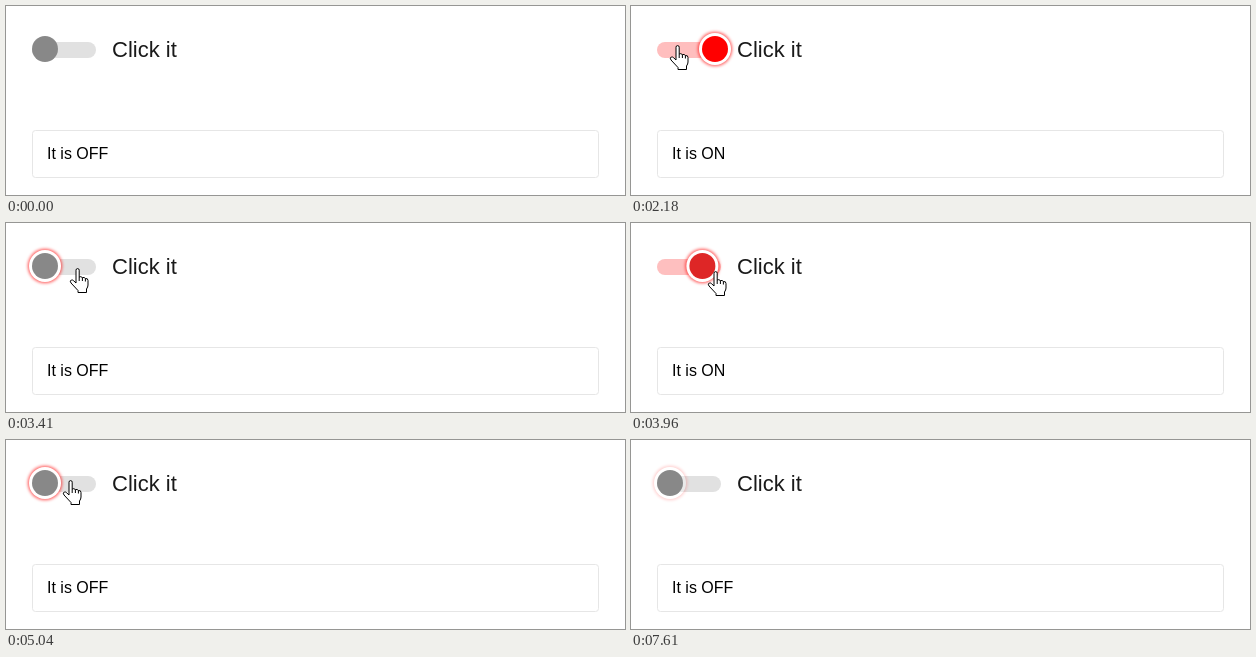
An HTML page that plays this animation: 619 px wide and 189 px high, repeating every 7690 ms.

```html
<!DOCTYPE html>
<html lang="en">
<head>
<meta charset="utf-8">
<title>Toggle switch</title>
<style>
  html, body { margin: 0; width: 100%; height: 100%; overflow: hidden; background: #fff; }
  svg { display: block; font-family: Arial, "Liberation Sans", sans-serif; }
  #cursor path { fill: #fff; stroke: #000; stroke-linejoin: round; }
</style>
</head>
<body>
<svg width="619" height="189" viewBox="0 0 619 189">
  <filter id="soft" x="-30%" y="-30%" width="160%" height="160%"><feGaussianBlur stdDeviation="1.4"/></filter>
  <rect id="track" x="26" y="36" width="64" height="16" rx="8"/>
  <g id="knob">
    <g id="ring">
      <circle r="17.3" fill="#f00" fill-opacity=".6" filter="url(#soft)"/>
      <circle r="16" fill="#fff"/>
    </g>
    <circle id="dot" r="13"/>
  </g>
  <text x="106" y="51" font-size="22" fill="#1a1a1a">Click it</text>
  <rect x="26.5" y="124.5" width="566" height="47" rx="3" fill="#fff" stroke="#e6e6e6"/>
  <text id="state" x="41" y="153" font-size="16"></text>
  <g id="cursor">
    <circle id="press" r="12" fill="#ffeb00" fill-opacity=".55"/>
    <g id="hand">
      <path d="M0 14V1.2a1.6 1.6 0 0 1 3.2 0V8q1.6-1 3.2.6q2-.7 3 .9q2.6-.4 2.6 2V16q0 2-1.5 4V23.5H2V21.5L-5 14q-1.6-2.2.3-3q1.2-.4 2.4.8z"/>
      <path d="M3.2 8v4M6.4 8.6V12M9.4 9.5v3"/>
    </g>
    <path id="arrow" d="M0 0V17l4-4 2.6 6 2.4-1-2.6-6H12z"/>
    <path id="beam" d="M-3.5-8.5H3.5M0-8.5V8.5M-3.5 8.5H3.5"/>
  </g>
</svg>
<script>
const LOOP = 7690, STEP = 77;
const el = id => document.getElementById(id);
const show = (id, on) => el(id).setAttribute("display", on ? "inline" : "none");
const mix = (a, b, p) => a + (b - a) * p;
const rgb = (a, b, p) => `rgb(${a.map((v, i) => Math.round(mix(v, b[i], p)))})`;
const smooth = p => p * p * (3 - 2 * p);

// first change, last change, number of changes, destination
const moves = [
  [460, 1170, 10, 63, 41],
  [2000, 2330, 5, 35, 40],
  [2560, 2560, 1, 34, 40],
  [3020, 3410, 6, 70, 46],
  [3490, 3650, 3, 83, 49],
  [4195, 4510, 5, 63, 41],
  [6850, 7230, 6, 518, 189]
];
// press, release
const clicks = [[1390, 1546], [2710, 2866], [3730, 3880], [4660, 4810], [5740, 5910], [6600, 6770]];
const slide = [.2, .72, .95, 1];
const slideAt = ms => slide[Math.min(3, Math.floor(ms / STEP))];

function cursorAt(t) {
  let x = 500, y = 170;
  for (const [from, to, n, tx, ty] of moves) {
    if (t < from) break;
    const done = t >= to ? n : Math.floor((t - from) / (to - from) * (n - 1)) + 1;
    const p = smooth(done / n);
    x = mix(x, tx, p);
    y = mix(y, ty, p);
  }
  return [x, y];
}

function draw(t) {
  const past = clicks.filter(c => t >= c[1]);
  const on = past.length % 2 === 1;
  const p = past.length ? slideAt(t - past[past.length - 1][1]) : 1;
  const pos = on ? p : 1 - p;
  const tint = Math.min(1, p * 1.35);

  el("knob").setAttribute("transform", `translate(${mix(39, 84, pos)} 43)`);
  el("dot").setAttribute("fill", rgb([136, 136, 136], [255, 0, 0], pos));
  el("track").setAttribute("fill", rgb([225, 225, 225], [255, 190, 190], on ? tint : 1 - tint));
  el("state").textContent = on ? "It is ON" : "It is OFF";

  const start = clicks[0][1];
  el("ring").setAttribute("opacity", t < start ? 0 : t >= 7610 ? .3 : slideAt(t - start));

  const [x, y] = cursorAt(t);
  const inSwitch = x > 24 && x < 172 && y > 28 && y < 58;
  const inField = x > 26 && x < 593 && y > 124 && y < 172;
  show("cursor", t >= 460 && t < 7230);
  show("hand", inSwitch);
  show("beam", inField);
  show("arrow", !inSwitch && !inField);
  show("press", clicks.some(([down, up]) => t >= down && t < up));
  el("cursor").setAttribute("transform", `translate(${Math.round(x)} ${Math.round(y)})`);
}

const begin = performance.now();
function tick() {
  draw((performance.now() - begin) % LOOP);
  requestAnimationFrame(tick);
}
tick();
</script>
</body>
</html>
```
